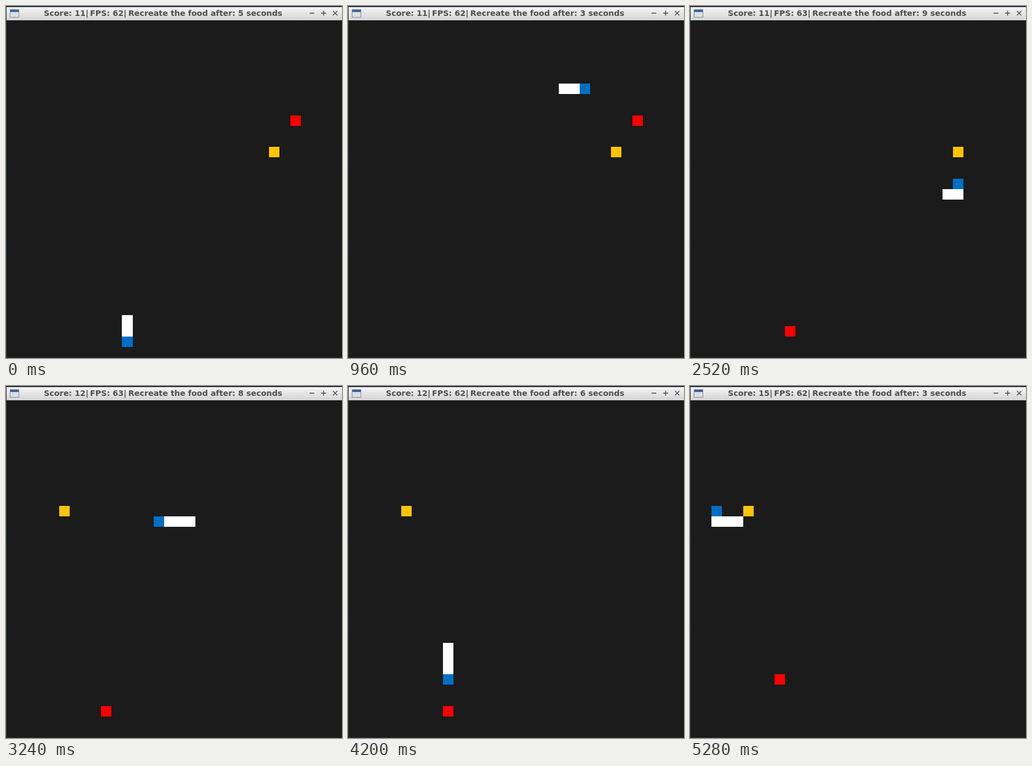
An HTML page with a canvas for the animation above (5.4 s loop, 612 by 640 pixels).

```html
<!DOCTYPE html>
<html lang="en">
<head>
<meta charset="utf-8">
<title>Snake</title>
<style>
  html, body { margin: 0; width: 100%; height: 100%; overflow: hidden; background: #1b1b1b; }
  canvas { display: block; }
</style>
</head>
<body>
<canvas id="stage" width="612" height="640"></canvas>
<script>
const ctx = document.getElementById('stage').getContext('2d');
const STEP = 120, STEPS = 45, ROWS = 32;
const DIRS = { U: [0, -1], D: [0, 1], L: [-1, 0], R: [1, 0] };

// Route of the head; the board wraps vertically.
const ROUTE = 'D10 R17 D5 L8 D5 R5 U5 L16 D32 L7 U1';
const path = [[11, 28]];
for (const leg of ROUTE.split(' ')) {
  const [dx, dy] = DIRS[leg[0]];
  for (let i = 0; i < +leg.slice(1); i++) {
    const [x, y] = path[path.length - 1];
    path.push([x + dx, (y + dy + ROWS) % ROWS]);
  }
}

// [step, cells travelled]
const PACE = [[0, 0], [8, 19], [16, 37], [21, 49], [25, 58], [27, 64], [30, 72], [35, 84], [44, 109]];

function travelled(step) {
  const i = Math.max(1, PACE.findIndex(([s]) => s >= step));
  const [s0, d0] = PACE[i - 1], [s1, d1] = PACE[i];
  return Math.round(d0 + (d1 - d0) * (step - s0) / (s1 - s0));
}

function rect(color, x, y, w, h) {
  ctx.fillStyle = color;
  ctx.fillRect(x, y, w, h);
}

const colX = c => Math.round(1.05 + 19.13 * c);
const rowY = r => Math.round(26.3 + 19.15 * r);

function cell(color, [c, r]) {
  const x = colX(c), y = rowY(r);
  rect(color, x, y, colX(c + 1) - x, rowY(r + 1) - y);
}

function line(x0, y0, x1, y1) {
  ctx.beginPath();
  ctx.moveTo(x0, y0);
  ctx.lineTo(x1, y1);
  ctx.stroke();
}

function titleBar(score, fps, seconds) {
  const shade = ctx.createLinearGradient(0, 1, 0, 26);
  shade.addColorStop(0, '#f6f6f6');
  shade.addColorStop(1, '#d4d4d4');
  rect('#252a36', 0, 0, 612, 2);
  rect(shade, 1, 2, 611, 24);

  rect('#7b8595', 7, 6, 17, 15);
  rect('#3c64a4', 8, 7, 15, 4);
  rect('#dcdfe1', 8, 11, 15, 9);

  ctx.fillStyle = '#4d4d4d';
  ctx.font = 'bold 14.3px "DejaVu Sans", sans-serif';
  ctx.fillText(`Score: ${score}|`, 69, 18);
  ctx.fillText(`FPS: ${fps}|`, 153, 18);
  ctx.fillText(`Recreate the food after: ${seconds} seconds`, 222.8, 18);

  ctx.strokeStyle = '#555';
  ctx.lineWidth = 1.7;
  line(553, 13, 561.5, 13);
  line(574, 13, 583, 13);
  line(578.5, 8.5, 578.5, 17.5);
  line(595.5, 9, 603.5, 17);
  line(603.5, 9, 595.5, 17);
}

function draw(step) {
  const moved = travelled(step);
  const ateYellow = moved >= 52, ateRed = moved >= 87;
  const ticks = Math.floor(step / 4);
  const seconds = ticks < 5 ? 5 - ticks : 14 - ticks;
  const score = 11 + (ateYellow ? 1 : 0) + (ateRed ? 3 : 0);

  rect('#1b1b1b', 0, 0, 612, 640);
  rect('#454749', 0, 26, 1, 614);
  rect('#1d5266', 0, 274, 1, 14);
  rect('#1d5266', 0, 430, 1, 14);
  rect('#303030', 0, 639, 612, 1);
  titleBar(score, step >= 20 && step < 32 ? 63 : 62, seconds);

  cell('#ff0000', ateRed ? [8, 26] : step < 20 ? [27, 9] : [9, 29]);
  cell('#ffc400', ateYellow ? [5, 10] : [25, 12]);

  const head = moved + 2;
  for (let i = ateYellow ? 3 : 2; i > 0; i--) cell('#ffffff', path[head - i]);
  cell('#0070c6', path[head]);
}

const start = performance.now();
function frame() {
  draw(Math.floor((performance.now() - start) / STEP) % STEPS);
  requestAnimationFrame(frame);
}
frame();
</script>
</body>
</html>
```
